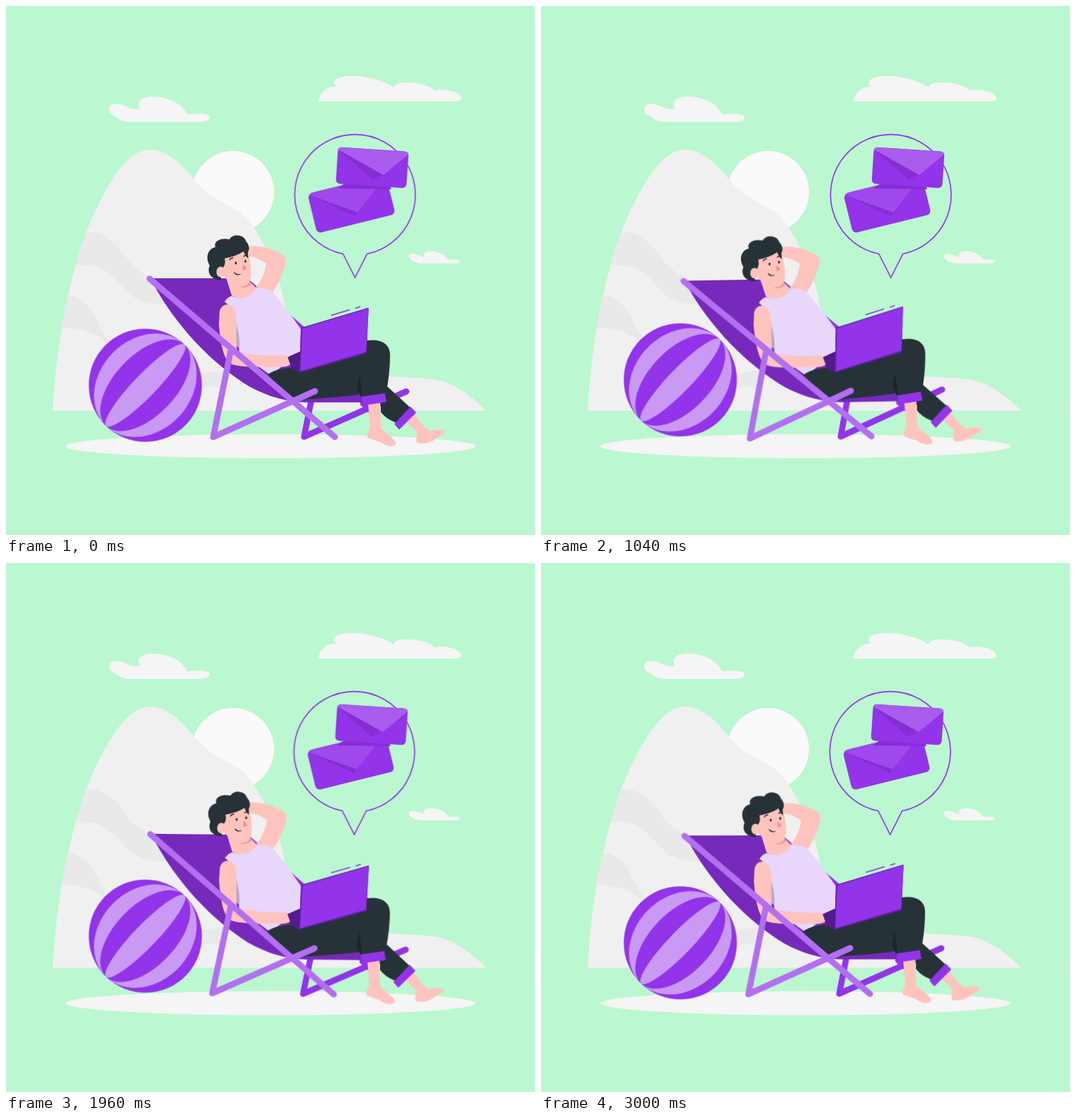
An HTML page without scripts for the animation above (3.04 s loop, 748 by 748 pixels).

```html
<!DOCTYPE html>
<html lang="en">
<head>
<meta charset="utf-8">
<title>Beach mail</title>
<style>
html,body{margin:0;width:100%;height:100%;overflow:hidden;background:#bbf7d0}
svg{display:block;width:100vw;height:100vh}
.ball{animation:float 1520ms linear -45ms infinite}
.chair{transform-origin:409px 473px;animation:sway 1520ms linear -45ms infinite}
.bubble{animation:shake 3040ms linear -48ms infinite}
@keyframes float{50%{transform:translateY(-15px)}}
@keyframes sway{25%{transform:rotate(1deg)}75%{transform:rotate(-1deg)}}
@keyframes shake{
10%,90%{transform:translateX(-1.5px)}
20%,80%{transform:translateX(3px)}
30%,50%,70%{transform:translateX(-6px)}
40%,60%{transform:translateX(6px)}
}
.p{fill:#9333ea}.ink{fill:#263238}.skin{fill:#ffc3bd}.pale{fill:#c999f4}
.bar{fill:none;stroke-width:8.6;stroke-linecap:round;stroke-linejoin:round}
.thin{fill:none;stroke:#263238;stroke-width:1.3;stroke-linecap:round}
</style>
</head>
<body>
<svg viewBox="0 0 748 748">
<g transform="scale(1.496)" fill="none" stroke="#ebebeb" stroke-width=".25">
<path d="M0 382.5H500M417 398.6h33M322.5 401.3h8.7M396.6 389.3h19.2M52.5 391h43.2M104.6 391h6.3M131.5 395.2h93.7"/>
<rect x="38.3" y="55.1" width="204.3" height="282.6" rx="5.6"/>
<rect x="254.6" y="55.1" width="204.3" height="282.6" rx="5.6"/>
</g>

<g fill="#f5f5f5">
<path d="M172 164C164 163 160 160 156 157C149 154 145 150 146 145C147 137 160 137 170 142C174 145 182 147 190 145C183 137 190 129 204 128C228 127 250 138 256 153C266 152 288 151 288 157C288 162 281 164 275 164Z"/>
<path d="M441 135C445 120 455 113 468 114C458 108 465 100 485 99C510 98 535 106 548 115C550 106 575 107 590 111C598 113 603 116 606 120C618 115 645 122 644 131C643 135 638 135 630 135Z"/>
<path d="M585 364C572 362 568 355 570 352C575 348 585 353 592 355C588 348 597 346 605 347C615 348 622 353 625 359C632 358 642 358 642 361C641 364 636 364 632 364Z"/>
</g>

<circle cx="321" cy="263" r="58" fill="#fafafa"/>
<path fill="#f0f0f0" d="M66 572C70 490 85 400 113 320C140 255 170 203 204 203C232 203 256 233 272 252C290 272 315 280 333 293C352 308 378 360 390 402C396 430 400 470 410 510L548 524C570 525 590 526 605 528C632 532 655 549 679 572Z"/>
<g fill="#e9e9e9">
<path d="M113 320C135 318 152 331 168 353C183 376 202 386 230 388V422C192 422 180 415 163 395C146 374 128 363 98 367Z"/>
<path d="M87 411C101 408 119 421 130 446C137 462 143 472 152 480L140 475C121 458 100 455 78 456Z"/>
<path d="M276 520L312 514L304 542C295 536 286 538 276 541Z"/>
</g>
<ellipse cx="374" cy="622.5" rx="290" ry="17" fill="#f5f5f5"/>

<g class="ball">
<g transform="translate(197 537.2) rotate(-46)">
<circle class="p" r="80"/>
<ellipse class="pale" rx="80" ry="65"/>
<ellipse class="p" rx="80" ry="43"/>
<ellipse class="pale" rx="80" ry="16"/>
</g>
</g>

<g class="bubble">
<path fill="none" stroke="#9333ea" stroke-width="1.6" d="M476.7 350.5A85.3 85.3 0 1 1 510.7 350.5L493.7 384Z"/>
<g transform="translate(488.7 280.2) rotate(-13.8)">
<rect class="p" x="-57" y="-28.5" width="114" height="57" rx="6.500"/>
</g>
<path fill="#842ed3" d="M430 268L493 297L502 288L470 270Z"/>
<path fill="#9f48ec" d="M429 267.500Q430 264 436 263L485 251L527 254L497.500 292Z"/>
<path fill="#842ed3" d="M469 258L479 251H542L545 259Z"/>
<g transform="translate(518 228.500) rotate(3.8)">
<rect class="p" x="-50" y="-26" width="100" height="52" rx="6"/>
</g>
<path fill="#842ed3" d="M470 203L519 246L536 236Z"/>
<path fill="#a95cee" d="M469.500 203Q471 200 476 200L565 206Q570 207 569 210L534 239Z"/>
</g>

<g class="chair"><g transform="rotate(-.12 409 473)">
<path class="bar" stroke="#9333ea" d="M336 386L440 475M432 556L421.500 609L566 545M505 562L515 571"/>
<path fill="#7629bb" d="M204 385H328L418 460L520 550L505 560.500H425C396 560 370 552 344 538C293 507 239 453 204 385Z"/>
<path class="skin" d="M338 340C355 337 378 343 391 352C398 357 396 364 392 374C387 390 380 400 375 407L353 398C362 388 366 376 368 364C360 358 350 354 340 354Z"/>
<path class="skin" d="M310 380L319 409C330 418 350 412 355 400L343 388Z"/>
<path fill="#f29a96" d="M328 395C335 398 341 395 344 390L347 393C342 398 334 400 328 395Z"/>
<path class="skin" d="M306 358L341 346C347 362 347 376 346 385C343 397 334 398 326 395C318 393 311 387 307 380Z"/>
<path class="ink" d="M305 387.500C292 388 283 379 288 367C281 355 286 343 296 341C293 332 304 327 316 330C320 322 336 322 339.500 333C345 338 344 346 342 348L342.500 357C339 354 337 350 336 347C328 352 319 355 309 357C311 363 309 368 306 371L302 379Z"/>
<ellipse class="skin" cx="303.500" cy="376" rx="6" ry="7.500"/>
<ellipse class="ink" cx="325" cy="363.500" rx="1.400" ry="2"/>
<ellipse class="ink" cx="338.500" cy="361" rx="1.400" ry="2"/>
<path fill="#f98a86" d="M335 365L340 371Q338 374 334.500 373Z"/>
<path class="thin" d="M316 359Q318 356 321 356M336 354Q338 352 341 354M323 377Q326 381 331 379.500"/>

<path fill="#e8d6fb" d="M309 418Q313 412 319 410C330 415 347 413 353 399C362 398 373 400 378 405C392 422 405 440 417 457L416 490L374 522L330 490C328 460 325 430 309 418Z"/>
<path fill="#b9a9c9" d="M324 444C328 455 331 470 330 484L325 480Z"/>
<path class="ink" d="M370 521C383 512 398 512 415 510L510 473C531 470 543 478 543 493C543 515 540 535 537 550L503 555L500 549C470 554 430 555 408 558C392 545 380 532 370 521Z"/>
<path class="skin" d="M564 586L577 576C585 588 592 598 600 601C608 598 621 598 620.500 603C617 608 609 609 604 614C598 618 588 620 582 618C578 616 583 606 580 601Z"/>
<path class="skin" d="M512 562L529 560L530 598C540 605 553 615 551 620C546 625 535 621 530 617L513 611C508 609 513 600 515 596Z"/>
<path class="ink" d="M538 537L574 570L554 590C544 587 534 580 530 574V550Z"/>
<path fill="#1b262b" d="M500 520L504 552L500 549L496 540Z"/>
<path class="p" d="M549 591L572 566.500L580 575L556 599ZM502.500 552.500L535.500 547.500L538 560L504 565Z"/>
<path fill="#521c8a" d="M397 497L417 488L415 518L404 513Z"/>
<path class="skin" d="M302 432C305 418 321 420 324 432C328 455 324 474 327 488C340 492 362 495 388 494Q396 493 398 496L402 507C396 511 388 511 380 510C360 511 330 511 318 506C306 500 303 470 301 450Z"/>
<path fill="#6322a3" d="M417 455L512.500 426.500L510 491L415 518.500Z"/>
<path class="p" d="M419 456L513 427.500L509 489L416 516.500Z"/>
<path fill="none" stroke="#9333ea" stroke-width="1.600" d="M459.500 437.500L486 429.500M494 427.500L501 425"/>
<path class="bar" stroke="#b26ff0" d="M203 385.500L465 609.500M318 486L293 609.500L437 544.500"/>
</g></g>
</svg>
</body>
</html>
```
